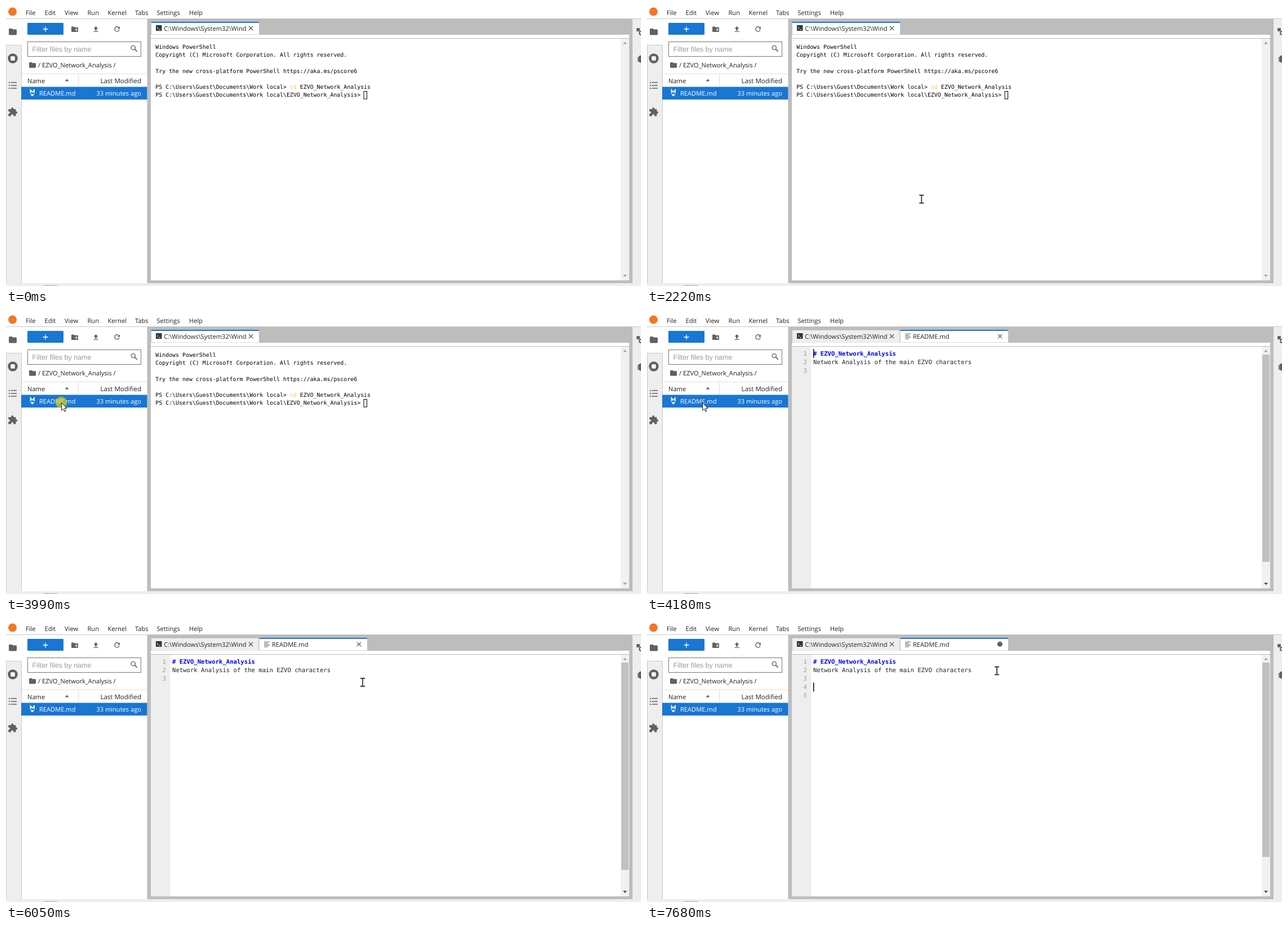
Animation of 1127 by 497 pixels, one loop 8000 ms. Source, as an HTML page:

```html
<!DOCTYPE html>
<html lang="en">
<head>
<meta charset="utf-8">
<title>Notebook workspace</title>
<style>
html, body { margin: 0; width: 100%; height: 100%; overflow: hidden; background: #fff; }
svg { display: block; }
text { font: 11.12px "Open Sans", "Noto Sans", sans-serif; fill: #212121; white-space: pre; text-rendering: geometricPrecision; }
.end { text-anchor: end; }
.term text { font: 9.91px "DejaVu Sans Mono", monospace; fill: #000; }
.code text { font: 10.61px "DejaVu Sans Mono", monospace; }
.code .num { fill: #999; text-anchor: end; }
.code .head { font-weight: 700; fill: #00f; }
.icon { fill: #616161; }
.line { fill: none; stroke: #616161; stroke-width: 1.4; }
.rule { fill: none; stroke: #e0e0e0; }

.editor, .line4, .line5, .thumb, .clean, .dirty, .caret, .pointer, .beam, .arrow, .click {
  animation: 8s step-end -4ms infinite;
}
.editor { animation-name: editor; }
.line4, .dirty { animation-name: enter1; }
.line5 { animation-name: enter2; }
.clean { animation-name: clean; }
.thumb { animation-name: thumb; }
.caret { animation-name: caret; }
.pointer { animation-name: show, move; }
.beam { animation-name: beam; }
.arrow { animation-name: arrow; }
.click { animation-name: click; }

@keyframes editor { 0% { opacity: 0 } 52.25%, 100% { opacity: 1 } }
@keyframes enter1 { 0% { opacity: 0 } 94.25%, 100% { opacity: 1 } }
@keyframes enter2 { 0% { opacity: 0 } 96%, 100% { opacity: 1 } }
@keyframes clean { 0% { opacity: 1 } 94.25%, 100% { opacity: 0 } }
@keyframes thumb { 0% { height: 368px } 94.25% { height: 356px } 96%, 100% { height: 345px } }
@keyframes caret {
  0%, 65.5% { opacity: 1; transform: translate(295px, 62px) }
  58.875%, 72.25% { opacity: 0; transform: translate(295px, 62px) }
  78.875% { opacity: 1; transform: translate(295px, 62px) }
  80.25%, 93.5% { opacity: 1; transform: translate(576px, 77px) }
  86.875% { opacity: 0; transform: translate(576px, 77px) }
  94.25% { opacity: 1; transform: translate(295px, 92px) }
  96%, 100% { opacity: 1; transform: translate(295px, 107.5px) }
}
@keyframes show { 0% { opacity: 0 } 6.625%, 100% { opacity: 1 } }
@keyframes beam { 0%, 64.75%, 100% { opacity: 1 } 33.75% { opacity: 0 } }
@keyframes arrow { 0%, 64.75%, 100% { opacity: 0 } 33.75% { opacity: 1 } }
@keyframes click {
  0%, 49%, 51.5%, 81.875%, 100% { opacity: 0 }
  48.125%, 49.875%, 80.25% { opacity: .65 }
}
@keyframes move {
  0% { transform: translate(1053px, 462px) }
  6.625% { transform: translate(1053px, 462px); animation-timing-function: steps(3) }
  9.25% { transform: translate(1015px, 372px) }
  15% { transform: translate(1015px, 372px); animation-timing-function: steps(4) }
  18.375% { transform: translate(1011px, 365px); animation-timing-function: steps(3) }
  21% { transform: translate(850px, 336px); animation-timing-function: steps(2) }
  22.75% { transform: translate(600px, 345px); animation-timing-function: steps(2) }
  24.375% { transform: translate(514px, 356px) }
  26.875% { transform: translate(514px, 356px); animation-timing-function: steps(5) }
  31.125% { transform: translate(380px, 290px); animation-timing-function: steps(5) }
  35.5% { transform: translate(147px, 215px); animation-timing-function: steps(2) }
  37.125% { transform: translate(136px, 197px); animation-timing-function: steps(7) }
  43.25% { transform: translate(98px, 157px) }
  61.25% { transform: translate(98px, 157px); animation-timing-function: steps(4) }
  64.75% { transform: translate(300px, 240px); animation-timing-function: steps(4) }
  68.125% { transform: translate(520px, 275px); animation-timing-function: steps(4) }
  71.5% { transform: translate(635px, 198px); animation-timing-function: steps(2) }
  73.125% { transform: translate(651px, 170px); animation-timing-function: steps(3) }
  75.625% { transform: translate(633px, 107px); animation-timing-function: steps(3) }
  78.125%, 100% { transform: translate(621px, 86.5px) }
}
</style>
</head>
<body>
<svg width="1127" height="497" viewBox="0 0 1127 497">
  <defs>
    <path id="folder" d="M1.4 0H5.6L7 1.5H12.6Q14 1.5 14 3V10Q14 11.4 12.6 11.4H1.4Q0 11.4 0 10V1.4Q0 0 1.4 0Z"/>
    <path id="cross" d="M-3.7-3.7L3.7 3.7M3.7-3.7L-3.7 3.7" stroke="#424242" stroke-width="1.2"/>
    <path id="up" d="M-3.5 2H3.5L0-2Z"/>
  </defs>

  <rect width="1127" height="497" fill="#fff"/>

  <!-- menu bar -->
  <circle cx="11.5" cy="10" r="7.5" fill="#f37726"/>
  <g>
    <text x="35" y="15.5">File</text>
    <text x="68.5" y="15.5">Edit</text>
    <text x="104" y="15.5">View</text>
    <text x="144.500" y="15.5">Run</text>
    <text x="180.500" y="15.5">Kernel</text>
    <text x="229" y="15.5">Tabs</text>
    <text x="267.500" y="15.5">Settings</text>
    <text x="325" y="15.5">Help</text>
  </g>

  <!-- side bars and dock -->
  <path d="M0 69H27V492H1112V23H1127V497H0Z" fill="#eee"/>
  <path d="M0 22.500H1127M0 69.500H27M.5 69V492M27.500 69V492" fill="none" stroke="#c8c8c8"/>
  <path d="M250.500 23H1112V492H250.500Z" fill="#bdbdbd"/>
  <rect x="65" y="495.500" width="27" height="6" rx="3" fill="#bdbdbd"/>

  <g class="icon">
    <use href="#folder" x="5" y="40"/>
    <circle cx="12" cy="93" r="8.700"/>
    <rect x="8.300" y="89.300" width="7.400" height="7.400" rx=".8" fill="#fff"/>
    <path d="M5 135H7V137H5ZM8.500 135H19V136.600H8.500ZM5 140H7V142H5ZM8.500 140.200H19V141.800H8.500ZM5 145H7V147H5ZM8.500 145.200H19V146.800H8.500Z"/>
    <path d="M5.500 183H9.300V182A2 2 0 0 1 13.300 182V183H16.500Q17.500 183 17.500 184V187H18A2 2 0 0 1 18 191.200H17.500V194.500Q17.500 195.500 16.500 195.500H13.300V194.500A2 2 0 0 0 9 194.500V195.500H5.500Q4.200 195.500 4.200 194.300V191.200H5A2 2 0 0 0 5 187H4.200V184.200Q4.200 183 5.500 183Z"/>
    <g fill="none" stroke="#616161" stroke-width="2">
      <circle cx="1122" cy="42" r="2.100"/>
      <circle cx="1127" cy="48" r="3"/>
      <path d="M1119 39L1125 45M1125 39L1119 45" stroke-width="1"/>
    </g>
    <path d="M1127 87.500Q1122.500 88 1122.500 91H1120.500V92.600H1122.300V94H1120.500V95.600H1122.300V97H1120.500V98.500H1122.800Q1124 100.800 1127 100.800Z"/>
  </g>

  <!-- file browser -->
  <rect x="38" y="30" width="64" height="21" rx="1" fill="#1976d2"/>
  <path d="M65.500 41H74.500M70 36.500V45.500" stroke="#fff" stroke-width="1.300"/>
  <g class="icon">
    <path d="M117 36.500H120.500L121.800 37.800H127Q128 37.800 128 38.800V45Q128 46 127 46H117Q116 46 116 45V37.500Q116 36.500 117 36.500Z"/>
    <path d="M122.500 42H127M124.750 39.700V44.300" stroke="#fff" stroke-width="1.200"/>
    <path d="M159.500 36L163.500 40.300H161V43.500H158V40.300H155.500ZM155.500 44.700H163.500V46H155.500Z"/>
    <path class="line" d="M200.700 38.700A4.200 4.200 0 1 0 201.100 42.300"/>
    <path d="M202 36.500V40.800H197.700Z"/>
    <use href="#folder" transform="translate(41 100) scale(.86)"/>
    <use href="#up" x="108" y="131.500"/>
  </g>
  <rect x="38.500" y="63.500" width="201" height="26" fill="#fff" stroke="#757575"/>
  <text x="46.500" y="81" style="font:12.500px 'Liberation Sans',sans-serif;fill:#9a9a9a">Filter files by name</text>
  <circle class="line" cx="225.800" cy="74" r="3.600"/>
  <path class="line" d="M228.500 76.700L232.700 80.900" style="stroke-width:1.800"/>
  <text x="57" y="109">/ EZVO_Network_Analysis /</text>
  <path class="rule" d="M28 120.500H250M128.500 121V143"/>
  <text x="38" y="136.500">Name</text>
  <text class="end" x="240" y="136.500" style="font-size:11.500px">Last Modified</text>
  <rect x="27" y="143.500" width="223.500" height="22.500" fill="#1976d2"/>
  <path d="M43.500 155V149L46.700 153L50 149V155" fill="none" stroke="#fff" stroke-width="1.700"/>
  <path d="M42.800 156.500H50.600L46.700 160.500Z" fill="#fff"/>
  <text x="59" y="159" style="fill:#fff">README.md</text>
  <text class="end" x="240" y="159" style="fill:#fff">33 minutes ago</text>

  <!-- terminal -->
  <rect x="258" y="28" width="191" height="22.500" fill="#fff"/>
  <rect x="258" y="28" width="191" height="2" fill="#1976d2"/>
  <rect x="257" y="51" width="849" height="436" fill="#fff"/>
  <path d="M257 57.500H1106" stroke="#bdbdbd"/>
  <rect x="1091" y="58" width="15" height="429" fill="#f1f1f1"/>
  <g fill="#a3a3a3">
    <use href="#up" x="1098.500" y="65.500"/>
    <use href="#up" transform="translate(1098.500 479) scale(1 -1)"/>
  </g>
  <g class="term">
    <text x="265.300" y="75.500">Windows PowerShell</text>
    <text x="265.300" y="89.800">Copyright (C) Microsoft Corporation. All rights reserved.</text>
    <text x="265.300" y="118.500">Try the new cross-platform PowerShell https://aka.ms/pscore6</text>
    <text x="265.300" y="147.100">PS C:\Users\Guest\Documents\Work local> <tspan fill="#f9c74f">cd</tspan> EZVO_Network_Analysis</text>
    <text x="265.300" y="161.400">PS C:\Users\Guest\Documents\Work local\EZVO_Network_Analysis> </text>
    <rect x="635" y="151.500" width="5.500" height="13.500" fill="none" stroke="#000"/>
  </g>

  <!-- text editor -->
  <g class="editor">
    <rect x="258" y="28" width="191" height="22.500" fill="#eee"/>
    <path d="M258 28.500H449M448.500 28V50" fill="none" stroke="#c4c4c4"/>
    <rect x="449.500" y="28" width="191.500" height="22.500" fill="#fff"/>
    <rect x="449.500" y="28" width="191.500" height="2" fill="#1976d2"/>
    <path d="M458 35.500H468M458 38.300H465M458 41.200H468M458 44H465" class="line" style="stroke-width:1.200"/>
    <text x="472" y="44">README.md</text>
    <use class="clean" href="#cross" x="626.500" y="39.500"/>
    <circle class="dirty" cx="626.300" cy="39.300" r="4.500" fill="#616161"/>
    <rect x="257" y="58" width="834" height="429" fill="#fff"/>
    <rect x="257" y="58" width="34.500" height="429" fill="#eee"/>
    <rect class="thumb" x="1092" y="72" width="13" height="368" fill="#c1c1c1"/>
    <use href="#up" transform="translate(1098.500 479) scale(1 -1)" fill="#505050"/>
    <g class="code">
      <text class="num" x="284" y="73.500">1</text>
      <text class="num" x="284" y="88.700">2</text>
      <text class="num" x="284" y="103.900">3</text>
      <text class="num line4" x="284" y="119.100">4</text>
      <text class="num line5" x="284" y="134.300">5</text>
      <text class="head" x="295" y="73.500"># EZVO_Network_Analysis</text>
      <text x="295" y="88.700">Network Analysis of the main EZVO characters</text>
    </g>
    <rect class="caret" width="1.500" height="16" fill="#000"/>
  </g>

  <!-- terminal tab label -->
  <rect x="266" y="34" width="10.500" height="10" rx=".5" fill="#333"/>
  <path d="M268 37L270 39L268 41M271 41.700H274" fill="none" stroke="#fff" stroke-width=".9"/>
  <text x="280.300" y="44">C:\Windows\System32\Wind</text>
  <use href="#cross" x="434.500" y="39.500"/>

  <!-- mouse pointer -->
  <g class="pointer">
    <circle class="click" r="10.300" fill="#e8d800"/>
    <path class="beam" d="M-4-7H-1L0-6.500 1-7H4M0-6.500V6.500M-4 7H-1L0 6.500 1 7H4" fill="none" stroke="#000" stroke-width="1.400"/>
    <path class="arrow" d="M.5.500V14L3.600 11.200 5.800 16 8 15 5.900 10.400H10Z" fill="#fff" stroke="#000" stroke-width=".9"/>
  </g>
</svg>
</body>
</html>
```
